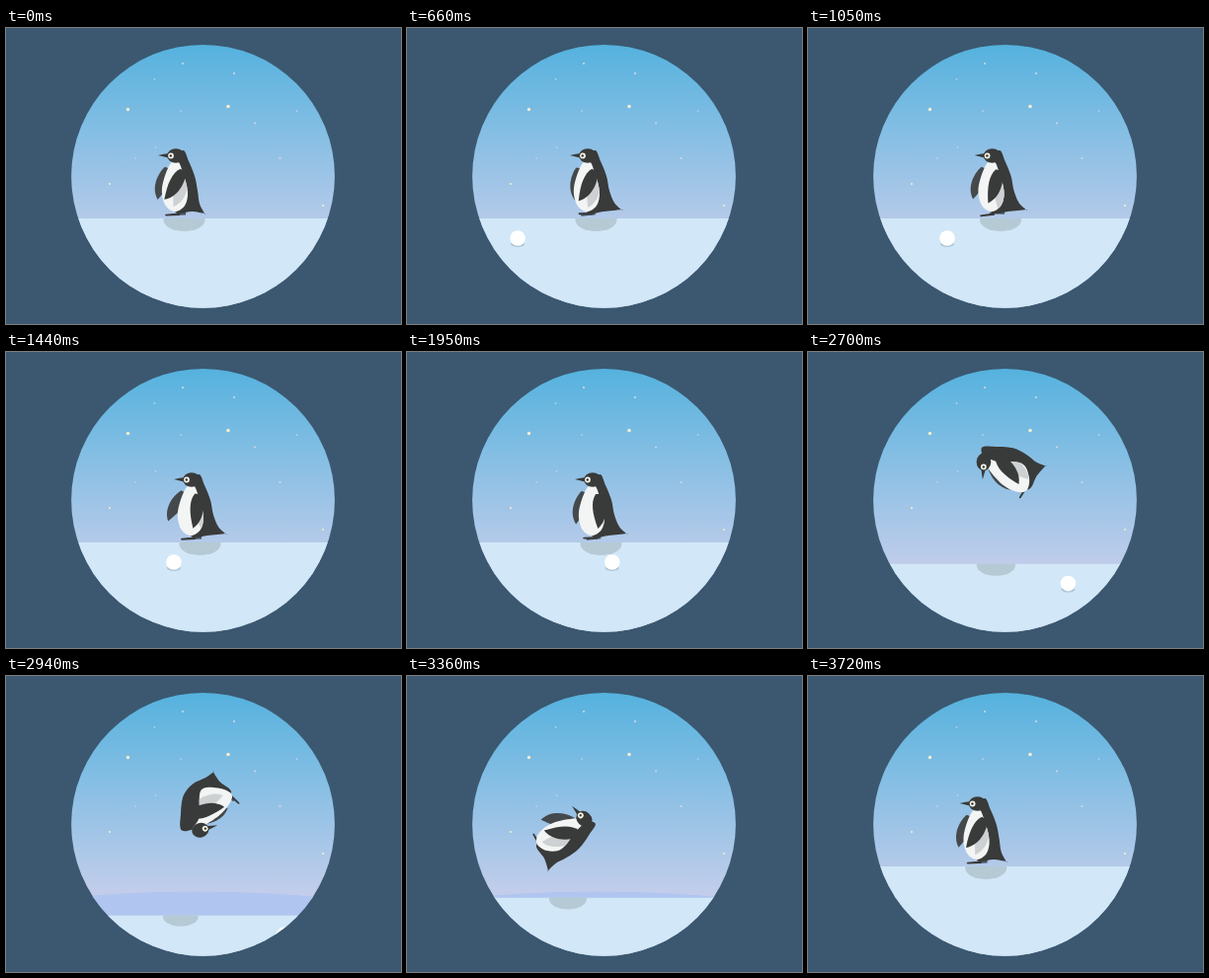
An HTML page for the animation above (3750 ms loop, 400x300 px).

```html
<!DOCTYPE html>
<html lang="en">
<head>
<meta charset="utf-8">
<title>Penguin and snowball</title>
<style>
html, body { margin: 0; width: 100%; height: 100%; overflow: hidden; background: #3b5870; }
svg { display: block; width: 400px; height: 300px; }
</style>
</head>
<body>
<svg viewBox="0 0 400 300" xmlns="http://www.w3.org/2000/svg">
  <defs>
    <linearGradient id="sky" gradientUnits="userSpaceOnUse" x1="0" y1="17" x2="0" y2="240">
      <stop offset="0" stop-color="#55b2de"/>
      <stop offset="1" stop-color="#cdd0ec"/>
    </linearGradient>
    <clipPath id="disc"><circle cx="199.5" cy="150.3" r="133.4"/></clipPath>
    <clipPath id="snow"><rect y="193" width="400" height="140"/></clipPath>
    <clipPath id="bellyClip"><path id="bellyEdge"/></clipPath>
    <path id="flipper" d="M-3,-2 C-8,6 -6,18 0,33 C10,24 9,8 4,-2 Z"/>
    <path id="foot" d="M1,-5 L3,-5 L3,3 L-11,3.6 Q-13,2.5 -11,1.8 L0,0.8 Z"/>
  </defs>
  <rect width="400" height="300" fill="#3b5870"/>
  <g clip-path="url(#disc)">
    <rect width="400" height="300" fill="url(#sky)"/>
    <g id="stars"></g>
    <ellipse cx="193" cy="245.5" rx="200" ry="27" fill="#b0c5ef"/>
    <g id="ground" clip-path="url(#snow)">
      <rect y="193" width="400" height="140" fill="#d2e7f7"/>
      <ellipse id="shade" cy="194.5" fill="#b6cad6"/>
      <g id="ball">
        <ellipse cy="219" rx="7" ry="3" fill="#afc6d6"/>
        <circle cy="213" r="7.8" fill="#fff"/>
      </g>
    </g>
    <g id="penguin" fill="#393a3a">
      <use id="footFar" href="#foot" fill="#485562"/>
      <use id="footNear" href="#foot"/>
      <g id="wingFar"><use href="#flipper" transform="scale(-1 .96)" fill="#44494c"/></g>
      <path id="body"/>
      <path id="belly" fill="#f3f4f4"/>
      <g clip-path="url(#bellyClip)"><use id="wingShade" href="#flipper" fill="#cdd1d3"/></g>
      <g id="head">
        <path d="M-6,-2.5 Q-12,-1.8 -18,-.6 Q-12,.8 -6,2.5 Z"/>
        <ellipse rx="8.8" ry="7.3"/>
        <circle cx="-5" r="2.9" fill="#f3f2e4"/>
        <circle cx="-5.2" r="1.2"/>
      </g>
      <use id="wingNear" href="#flipper"/>
    </g>
  </g>
</svg>
<script>
const LOOP = 3750;
const JUMP = 2470;
const PIVOT = [12, -12];
const $ = id => document.getElementById(id);
const set = (id, name, value) => $(id).setAttribute(name, value);
const place = (id, x, y, turn = 0) => set(id, 'transform', `translate(${x} ${y}) rotate(${turn})`);
const mix = (a, b, k) => a + (b - a) * k;
const span = (t, a, b) => Math.min(1, Math.max(0, (t - a) / (b - a)));
const ease = (t, a, b) => { const p = span(t, a, b); return p * p * (3 - 2 * p); };
const arch = p => Math.max(0, Math.sin(Math.PI * p));
const wave = (t, period, peak) => Math.cos(2 * Math.PI * (t - peak) / period);

// Closed Catmull-Rom outline
function outline(p) {
  const n = p.length, at = i => p[(i + n) % n];
  let d = `M${p[0]}`;
  for (let i = 0; i < n; i++) {
    const [a, b, c, e] = [at(i - 1), at(i), at(i + 1), at(i + 2)];
    d += `C${b[0] + (c[0] - a[0]) / 6},${b[1] + (c[1] - a[1]) / 6} `
       + `${c[0] - (e[0] - b[0]) / 6},${c[1] - (e[1] - b[1]) / 6} ${c}`;
  }
  return d + 'Z';
}

const BELLY = [[-7, -26], [-15, -20], [-22, 2], [-19, 19], [-9, 26], [1, 20], [4, 6], [-1, -14]];
const bodyShape = wag => {
  const tail = [21 + 5 * wag, 28 - 4 * wag];
  return [[-1, -36], [5, -25], [11, -10], [14, 5], [16 + 3 * wag, 18 - wag], tail, tail,
    [8, 26], [-8, 27], [-12, 8], [-12, -20]];
};

// Curling rounds the back outwards and draws the belly in
const bend = (curl, stretch) => ([x, y]) => [
  x > 0 || y < -34 ? x + 16 * curl * Math.cos((y + 5) / 35 * Math.PI / 2) : x * (1 - .4 * curl),
  y < 0 ? y * stretch : y
];

// How far the ground sinks while the view follows the jump
const sink = t => t < 3195
  ? 66 * (1 - (1 - span(t, 2550, 3200)) ** 1.5)
  : 66 * (1 - span(t, 3195, 3425) ** 2);

// Backs away from the ball, leaps forward, then slides back
function footing(t) {
  if (t < JUMP) return 196 - 16 * (1 - span(t, 0, 1500)) ** 2;
  if (t < 3340) return mix(196, 161, ease(t, JUMP, 3340));
  return mix(161, 180, 1 - (1 - span(t, 3340, LOOP)) ** 1.5);
}

function draw(t) {
  const x = footing(t), drop = sink(t), size = 1 - .003 * drop;
  place('ground', 0, drop);
  set('shade', 'cx', x + .5);
  set('shade', 'rx', 21 * size);
  set('shade', 'ry', 11.5 * size);
  place('ball', 112 + .0742 * (t - 660), 0);

  const flip = span(t, JUMP, 3510), air = span(t, JUMP, 3550);
  const curl = arch(flip) ** 1.5;
  const hop = 55 * (1 - .65 * air) * Math.sin(2 * Math.PI * air);
  const [px, py] = PIVOT;
  set('penguin', 'transform', `translate(${x + px} ${160 + py - hop}) `
    + `rotate(${-360 * flip ** 1.25}) translate(${-px} ${-py})`);

  const stretch = 1 + .11 * arch(span(t, 2200, 2700));
  const wag = ease(t, 0, 700) * (1 - ease(t, 2450, 2800));
  const shape = bend(curl, stretch), belly = outline(BELLY.map(shape));
  set('body', 'd', outline(bodyShape(wag).map(shape)));
  set('belly', 'd', belly);
  set('bellyEdge', 'd', belly);
  place('head', mix(-8, -11, curl), mix(-30.5, -22, curl) * stretch, -65 * curl);

  const near = 17 + 16 * wave(t, LOOP, 150) + 14 * curl;
  const wx = -2 + 8 * curl, wy = -14 - 3 * curl;
  place('wingNear', wx, wy, near);
  place('wingShade', wx + 2, wy + 4, near - 14);
  place('wingFar', -16 + 14 * curl, -16, 18 + 12 * wave(t, LOOP / 2, 1440));

  const step = Math.sin(8 * Math.PI * span(t, 0, 2300)), tuck = 5 * Math.min(1, 4 * curl);
  place('footNear', -7 + 2 * step, 27 - tuck - Math.max(0, step), 4 * step);
  place('footFar', -1 - 3 * step, 26.5 - tuck - Math.max(0, -step), 8 * curl - 5 * step);
}

const STARS = [[179, 36, 1], [231, 46, 1], [150.5, 52, .8], [123.5, 82.5, 1.7], [177, 84, .8],
  [225, 79.5, 1.8], [252, 96.5, .9], [294.5, 84, .8], [151.5, 121, .8], [131, 132, .7],
  [277.5, 132, 1], [105, 158, 1.1], [321, 180, 1.1]];
$('stars').innerHTML = STARS.map(([x, y, r]) =>
  `<circle cx="${x}" cy="${y}" r="${r}" fill="${r > 1 ? '#f2efcd' : '#dcd8e2'}"/>`).join('');

const start = performance.now();
function tick(now) {
  draw(Math.max(0, now - start) % LOOP);
  requestAnimationFrame(tick);
}
draw(0);
requestAnimationFrame(tick);
</script>
</body>
</html>
```
